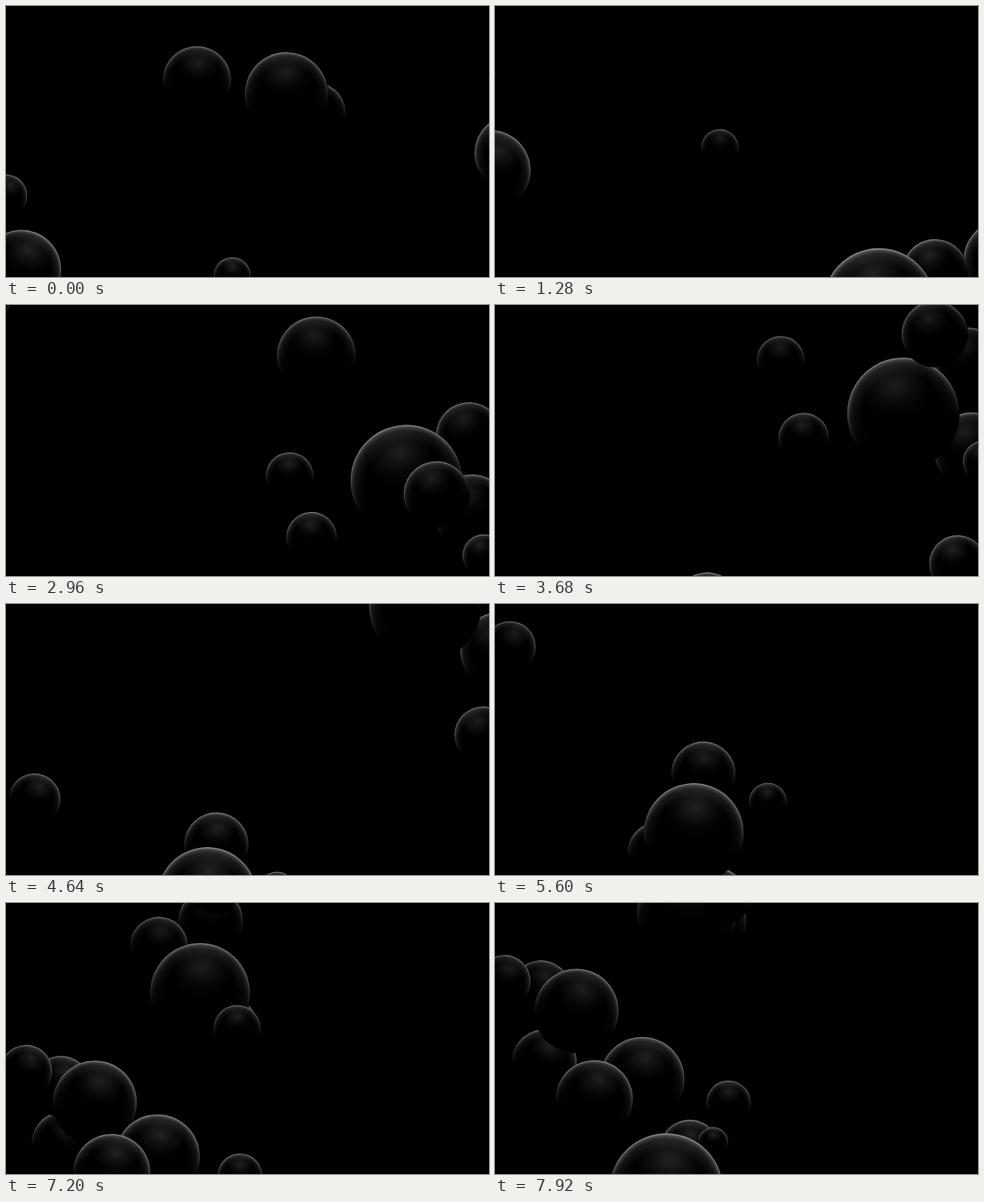
An HTML page with a canvas that plays this animation: 640x360 px, repeating every 8000 ms.

```html
<!DOCTYPE html>
<html lang="en">
<head>
<meta charset="utf-8">
<title>Rising spheres</title>
<style>
  html, body { margin: 0; width: 100%; height: 100%; overflow: hidden; background: #000; }
  canvas { display: block; width: 640px; height: 360px; }
</style>
</head>
<body>
<canvas id="stage" width="640" height="360"></canvas>
<script>
const ctx = document.getElementById('stage').getContext('2d');
const LOOP = 8000, STEP = 80, CENTER = 320, HORIZON = 780, SPREAD = .65;

// Waves from back to front. All spheres of a wave rise at one pace (growth per
// 10 s of the distance to the horizon); each has one key place: x, y, radius.
const waves = [
  { time: 0, pace: 2.07, balls: [
    [253, 98.5, 45], [410, 142, 40], [371.5, 116.5, 55], [671, 195, 50], [0, 252, 28]] },
  { time: 1280, pace: 2.1, balls: [[-6, 218, 53], [673, 337, 52]] },
  { time: 1280, pace: 2.65, balls: [[298, 188.5, 24.7]] },
  { time: 2240, pace: 2.1, balls: [[600, 258, 43.5], [604, 346, 50], [521, 310, 74]] },
  { time: 6480, pace: 1.94, balls: [[273.5, 122, 42.5]] },
  { time: 6480, pace: 2.95, balls: [
    [278.5, 137, 29.5], [208, 195, 38], [286, 286, 50],
    [88, 408, 43], [84, 346, 40], [127, 363.5, 55.5]] },
  { time: 6480, pace: 2.05, balls: [[260, 210, 66]] },
  { time: 6480, pace: 2.7, balls: [[364, 124, 25], [40, 321.5, 34.5]] },
  { time: 7920, pace: 2.9, balls: [
    [195, 234, 56], [131.5, 260, 51], [309.5, 265.5, 29.5],
    [258, 328, 40], [289, 318, 20], [227, 381, 75]] },
  { time: 3680, pace: 3.42, balls: [
    [378.5, 73, 31.5], [409, 177, 33.5], [613, 343.5, 37.5],
    [648, 208, 28], [55, 405, 34], [309, 596, 31]] },
  { time: 2240, pace: 4.7, balls: [[396, 210, 37.5], [407, 272, 52], [559, 403, 43.5]] }
];

function disc(r, fill) {
  ctx.beginPath();
  ctx.arc(0, 0, r, 0, 7);
  ctx.fillStyle = fill;
  ctx.fill();
}

function fade(gradient, rgb, stops) {
  for (const [at, alpha] of stops) gradient.addColorStop(at, `rgba(${rgb},${alpha})`);
  return gradient;
}

function sphere(x, y, r) {
  if (y - r > 360 || y + r < 0 || x - r > 640 || x + r < 0) return;
  const rim = ctx.createRadialGradient(0, 0, 0, 0, 0, r);
  const glow = ctx.createRadialGradient(0, -r * .5, 0, 0, -r * .5, r * .6);
  const shade = ctx.createLinearGradient(0, -r, 0, r * .35);
  ctx.save();
  ctx.translate(x, y);
  ctx.rotate((CENTER - x) * .0012); // the light hangs above the centre
  disc(r, '#000');
  ctx.globalAlpha = Math.min(1, .8 + Math.max(0, y) / 1800);
  disc(r, fade(rim, '255,255,255', [[.72, 0], [.9, .11], [.96, .26], [1, .62]]));
  disc(r, fade(glow, '255,255,255', [[0, .16], [.5, .08], [1, 0]]));
  ctx.globalAlpha = 1;
  // slightly wider, so that no light edge is left below
  disc(r + 1, fade(shade, '0,0,0', [[0, 0], [.4, .22], [.74, .68], [1, 1]]));
  ctx.restore();
}

function draw(t) {
  ctx.fillStyle = '#000';
  ctx.fillRect(0, 0, 640, 360);
  for (const { time, pace, balls } of waves) {
    const dt = (t - time) / 10000;
    const rise = Math.exp(pace * dt), drift = Math.exp(SPREAD * dt);
    for (const [x, y, r] of balls) {
      sphere(CENTER + (x - CENTER) * drift, HORIZON - (HORIZON - y) * rise, r);
    }
  }
}

const start = performance.now();
function tick() {
  const t = Math.floor((performance.now() - start) % LOOP / STEP) * STEP;
  draw(t < 2 * STEP ? 0 : t);
  requestAnimationFrame(tick);
}
tick();
</script>
</body>
</html>
```
